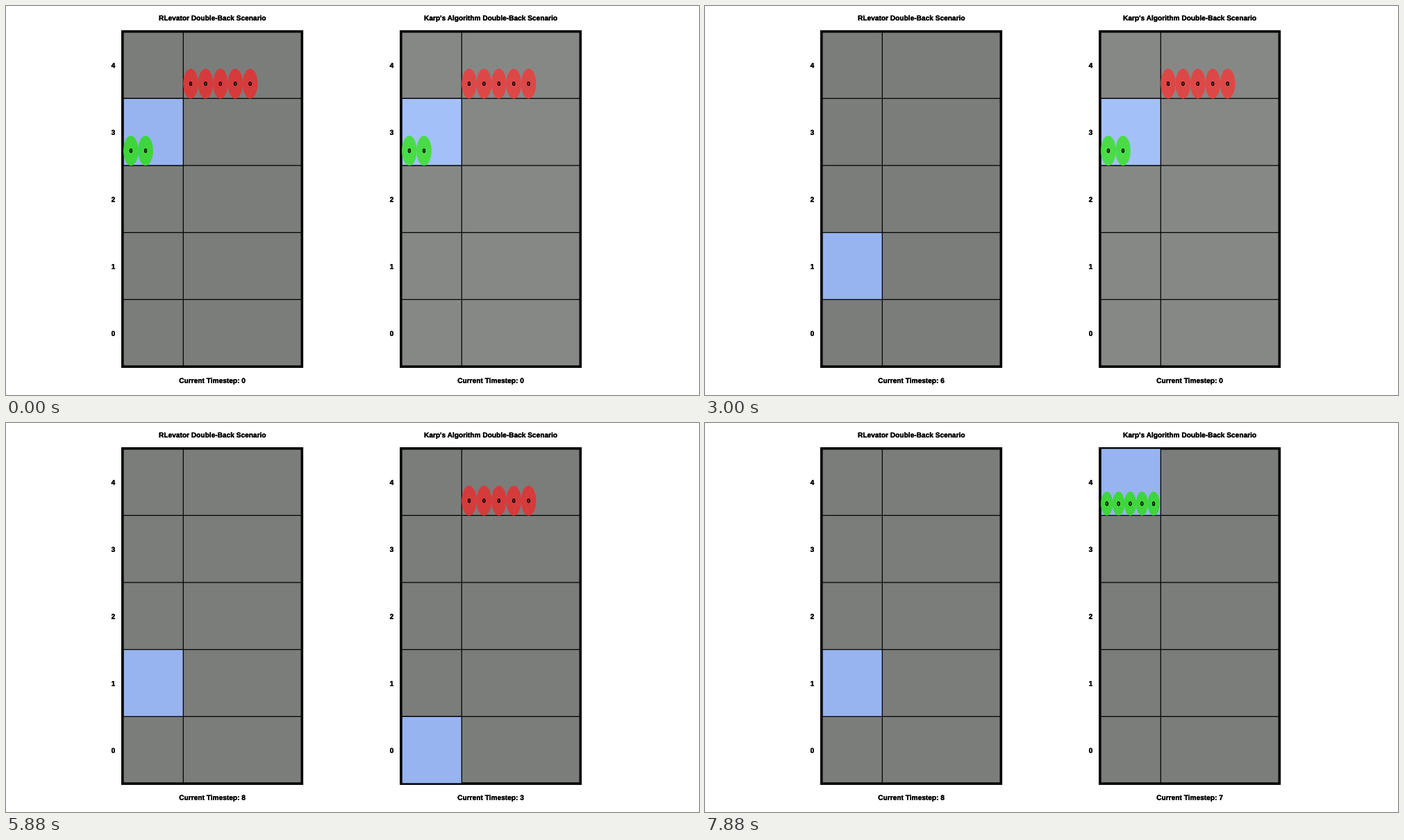
Animation, 998 px wide and 561 px high, one loop 8000 ms. Source, as a matplotlib script:

```python
import matplotlib.pyplot as plt
from matplotlib.animation import FuncAnimation
from matplotlib.patches import Ellipse, Rectangle
from matplotlib.patheffects import withStroke

W, H, DPI = 998, 561, 64
STEP, LOOP = 40, 8000
TICK = 494  # ms per timestep
PT = 72 / DPI  # points per pixel

plt.rcParams["font.family"] = "Liberation Sans"
plt.rcParams["font.weight"] = "bold"

FLOORS = 5
TOP, FLOOR_H = 36.65, 96.67
LEFT, SHAFT, RIGHT = 169.1, 255.3, 426.3
CAR_W = SHAFT - LEFT
PITCH = 21.4  # spacing of people when there is room
OFFSET = 401  # distance between the two buildings
LINE = 1.25 * PT

ACTIVE = dict(wall="#7b7d7b", car="#97b4f0", rider="#3ed63b", waiting="#d63b3c")
IDLE = dict(wall="#868886", car="#a3c1f8", rider="#4adc47", waiting="#dd4847")

fig = plt.figure(figsize=(W / DPI, H / DPI), dpi=DPI, facecolor="white")
ax = fig.add_axes([0, 0, 1, 1])
ax.set_xlim(0, W)
ax.set_ylim(H, 0)
ax.axis("off")


def label(x, y, text, size=10.15):
    """Text centred on x, with its capitals centred on y."""
    heavier = [withStroke(linewidth=0.25 * PT, foreground="black")]
    return ax.text(x, y + 0.36 * size, text, fontsize=size * PT, color="black",
                   ha="center", va="baseline", zorder=6, path_effects=heavier)


def box(x, y, w, h, **style):
    return ax.add_patch(Rectangle((x, y), w, h, snap=False,
                                  joinstyle="miter", **style))


def floor_bottom(floor):
    return TOP + (FLOORS - floor) * FLOOR_H


def ride(stops, riders=2, waiting=5):
    """One (floor, riders, waiting) per timestep while visiting the stops."""
    floor = stops[0]
    trip = [(floor, riders, waiting)]
    for stop in stops[1:]:
        while floor != stop:
            floor += 1 if stop > floor else -1
            if floor == 0:
                riders = 0
            elif floor == FLOORS - 1:
                riders, waiting = riders + waiting, 0
            trip.append((floor, riders, waiting))
    return trip


class Building:
    def __init__(self, dx, title, stops, start, last_step):
        self.dx, self.start, self.last_step = dx, start, last_step
        self.trip = ride(stops)
        self.people = []
        x, bottom = dx + 167.8, floor_bottom(0)
        frame = (x, TOP + 0.1, RIGHT - 167.8, bottom - TOP)
        self.wall = box(*frame, lw=0, zorder=1)
        line = dict(color="black", lw=LINE, zorder=2, snap=False)
        for floor in range(1, FLOORS):
            y = floor_bottom(floor)
            ax.plot([dx + LEFT, dx + RIGHT], [y, y], **line)
        ax.plot([dx + SHAFT] * 2, [TOP, bottom], **line)
        box(*frame, fill=False, ec="black", lw=3.6 * PT, zorder=3)
        self.car = box(dx + LEFT, 0, CAR_W, FLOOR_H, ec="black", lw=LINE, zorder=4)

        label(dx + 297, 17.1, title)
        for floor in range(FLOORS):
            label(dx + 154.4, floor_bottom(floor) - FLOOR_H / 2 + 0.5, str(floor))
        self.clock = label(dx + 297, 540, "")

    def add_people(self, count, x, floor, width, pitch, color):
        y = floor_bottom(floor) + 0.2 - width
        for i in range(count):
            cx = self.dx + x + pitch * (i + 0.5)
            body = Ellipse((cx, y), width, 2 * width, fc=color, lw=0, zorder=5)
            self.people += [ax.add_patch(body), label(cx, y, "0", 8.3)]

    def show(self, ms):
        step = int(min(max(ms - self.start, 0) // TICK, self.last_step))
        floor, riders, waiting = self.trip[min(step, len(self.trip) - 1)]
        colors = ACTIVE if ms > self.start - STEP / 2 else IDLE
        for artist in self.people:
            artist.remove()
        self.people = []
        self.wall.set_facecolor(colors["wall"])
        self.car.set_facecolor(colors["car"])
        self.car.set_y(floor_bottom(floor + 1))
        self.clock.set_text(f"Current Timestep: {step}")
        width = CAR_W / max(riders, 4)
        self.add_people(riders, LEFT + 0.2, floor, width,
                        min(PITCH, width - 0.4), colors["rider"])
        self.add_people(waiting, SHAFT, FLOORS - 1, CAR_W / 4, PITCH,
                        colors["waiting"])


buildings = [
    Building(0, "RLevator Double-Back Scenario", [3, 4, 0, 1], 16, 8),
    Building(OFFSET, "Karp's Algorithm Double-Back Scenario", [3, 0, 4], 4383, 7),
]


def draw(frame):
    for building in buildings:
        building.show(frame * STEP)
    return []


anim = FuncAnimation(fig, draw, frames=LOOP // STEP, interval=STEP,
                     init_func=lambda: draw(0), repeat=True, repeat_delay=0)
plt.show()
```
